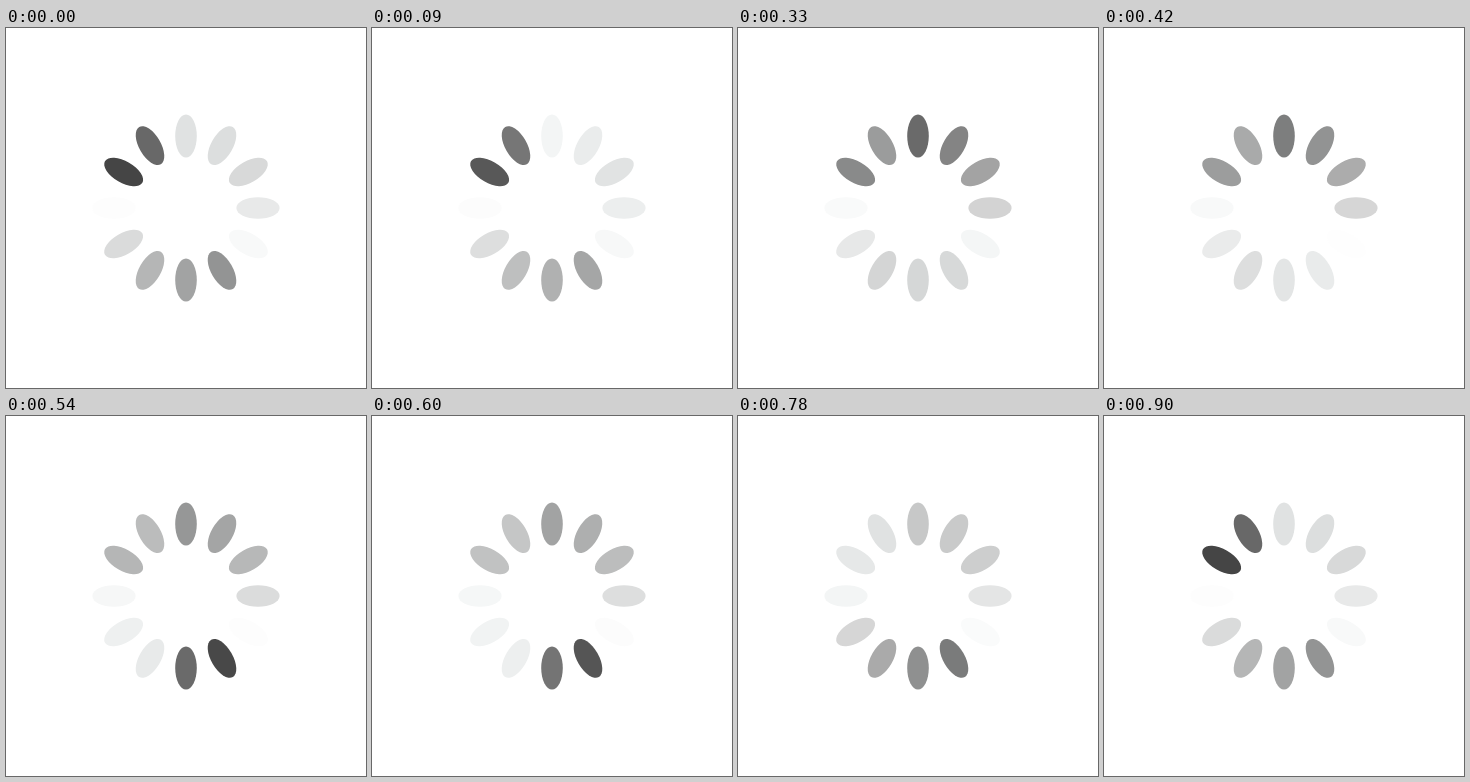
These frames come from a looping animation (360 px wide and 360 px high, 0.93 s). An HTML page:

```html
<!DOCTYPE html>
<html lang="en">
<head>
<meta charset="utf-8">
<title>Spinner</title>
<style>
  html, body { margin: 0; width: 100%; height: 100%; overflow: hidden; background: #fff; }
  svg { display: block; width: 100vw; height: 100vh; }
</style>
</head>
<body>
<svg id="stage" viewBox="0 0 360 360"></svg>
<script>
const COUNT = 12, LOOP = 930, CYCLE = 900, STEP = 30;
const HOLDS = [[330, 420], [540, 600], [690, 780]]; // pauses: from, until
const SHADES = [69, 104, 159, 209, 254];            // one trail, darkest first

const stage = document.getElementById('stage');
const lerp = (a, b, p) => a + (b - a) * p;

// Petals run clockwise from the top. Each trail starts 375 ms after the last,
// and its petals light up in pairs, 135 ms apart.
function makePetal(i) {
  const place = i % SHADES.length;
  const trail = Math.floor(i / SHADES.length);
  const node = document.createElementNS(stage.namespaceURI, 'ellipse');
  const attrs = { cx: 180, cy: 108, rx: 10.8, ry: 21.6, transform: `rotate(${i * 360 / COUNT} 180 180)` };
  for (const key in attrs) node.setAttribute(key, attrs[key]);
  stage.appendChild(node);
  return {
    node,
    start: 150 + 375 * trail + 135 * Math.floor(place / 2),
    dark: SHADES[place],
    light: place ? 243 : 255
  };
}

function snap(time) {
  const t = Math.floor((time % LOOP) / STEP) * STEP;
  const hold = HOLDS.find(([from, until]) => t >= from && t < until);
  return hold ? hold[0] : t;
}

const petals = Array.from({ length: COUNT }, (_, i) => makePetal(i));

function draw() {
  const t = snap(performance.now());
  for (const { node, start, dark, light } of petals) {
    const age = ((t - start + 2 * CYCLE) % CYCLE) / CYCLE;
    const grey = Math.round(lerp(dark, light, age));
    const cool = grey + Math.round(2 * age); // fades to a slightly cool grey
    node.setAttribute('fill', `rgb(${grey}, ${cool}, ${cool})`);
  }
  requestAnimationFrame(draw);
}
draw();
</script>
</body>
</html>
```
